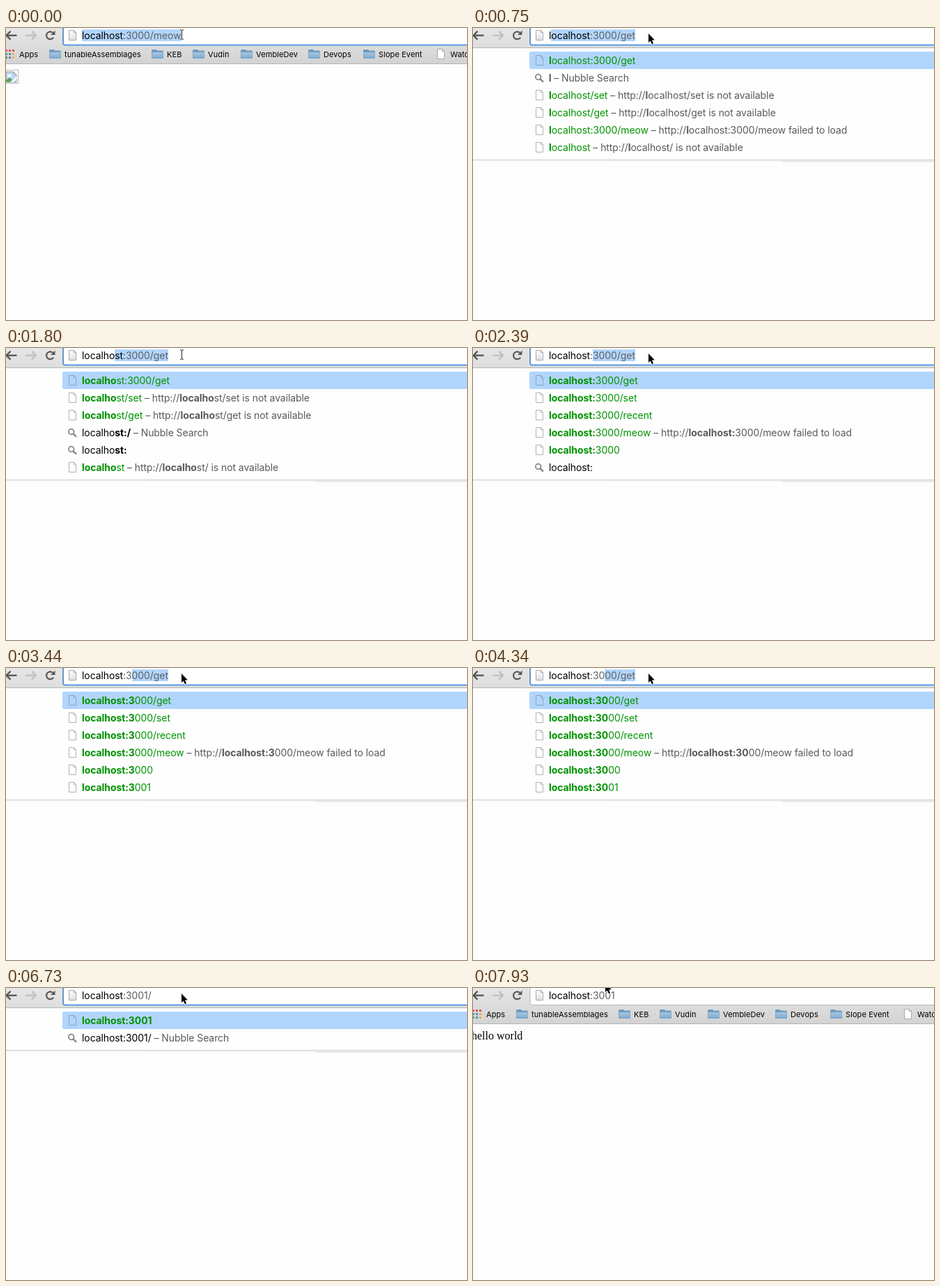
These frames come from a looping animation (662 by 420 pixels, 8 s). An HTML page with a canvas:

```html
<!DOCTYPE html>
<html lang="en">
<head>
<meta charset="utf-8">
<title>Address bar</title>
<style>
html, body { margin: 0; width: 100%; height: 100%; overflow: hidden; background: #fdfdfd; }
canvas { display: block; }
</style>
</head>
<body>
<canvas id="stage" width="662" height="420"></canvas>
<script>
const ctx = document.getElementById('stage').getContext('2d');
const W = 662, H = 420, LOOP = 8000;
const LEFT = 109, ROW = 25, BLUE = '#b1d5fd', GREEN = '#009200', GRAY = '#5a5a5a';
const HOST = 'localhost';

// Suggestion rows: kind (u = address, s = search), text, description
const u = (path, note) => ['u', HOST + path, note ? `http://${HOST}${note}` : ''];
const s = (text, note) => ['s', text, note || ''];
const SEARCH = 'Nubble Search';
const get = u(':3000/get'), set = u(':3000/set'), recent = u(':3000/recent');
const meow = u(':3000/meow', ':3000/meow failed to load');
const messages = u(':3000/messages', ':3000/messages is not available');
const plainSet = u('/set', '/set is not available');
const plainGet = u('/get', '/get is not available');
const plain = u('', '/ is not available');
const slash = s('localhost:/', SEARCH), colon = s('localhost:');

const first = [get, s('l', SEARCH), plainSet, plainGet, meow, plain];
const second = [get, plainSet, meow, slash, colon, plain];
const early = [get, plainSet, plainGet, slash, colon, plain];
const whole = [get, set, meow, messages, slash, plain];
const port = [get, set, recent, meow, u(':3000'), colon];
const digits = [get, set, recent, meow, u(':3000'), u(':3001')];
const short = [get, set];
const found = u(':3001');

// Start time, typed text, rows, matched part when it differs
const typing = [
  [750, 'l', first],
  [1050, 'lo', second],
  [1200, 'loc', early],
  [1350, 'loca', early],
  [1500, 'local', early],
  [1800, 'localho', early],
  [1940, 'localhos', early],
  [2090, 'localhost', whole],
  [2390, 'localhost:', port],
  [3440, 'localhost:3', digits],
  [4340, 'localhost:30', digits],
  [4490, 'localhost:300', digits],
  [4790, 'localhost:3001', short, 'localhost:300'],
  [5240, 'localhost:3001', [found, s('localhost:3001', SEARCH)]],
  [6130, 'localhost:3001/', [found, s('localhost:3001/', SEARCH)]]
];

const pointer = [
  [0, beam, 252, 9], [750, arrow, 252, 8], [1800, beam, 252, 9], [1940, arrow, 252, 8],
  [4640, beam, 252, 9], [4790, arrow, 252, 8], [7030, beam, 252, 9],
  [7630, beam, 215, 7], [7780, beam, 173, 2], [7930, arrow, 190, -7]
];

const at = (list, t) => list.filter(item => item[0] <= t).pop();

function rect(x, y, w, h, fill) {
  ctx.fillStyle = fill;
  ctx.fillRect(x, y, w, h);
}

function shade(y0, y1, top, bottom) {
  const g = ctx.createLinearGradient(0, y0, 0, y1);
  g.addColorStop(0, top);
  g.addColorStop(1, bottom);
  return g;
}

function trace(points, close) {
  ctx.beginPath();
  points.forEach(([x, y]) => ctx.lineTo(x, y));
  if (close) ctx.closePath();
}

function stroke(color, width) {
  ctx.strokeStyle = color;
  ctx.lineWidth = width;
  ctx.stroke();
}

function setFont(weight, size, spacing) {
  ctx.font = `${weight} ${size}px Inter, "Noto Sans", sans-serif`;
  ctx.letterSpacing = spacing + 'px';
}

// Draws a run of text and returns where it ends
function run(str, x, y, color, bold) {
  setFont(bold ? 700 : 400, 14, -0.08);
  ctx.fillStyle = color;
  ctx.fillText(str, x, y);
  return x + ctx.measureText(str).width;
}

function widthOf(str) {
  setFont(400, 14, -0.08);
  return ctx.measureText(str).width;
}

function pageIcon(x, y, fill, edge) {
  trace([[x + .5, y + .5], [x + 7.5, y + .5], [x + 10.5, y + 3.5], [x + 10.5, y + 14.5], [x + .5, y + 14.5]], true);
  if (fill) {
    ctx.fillStyle = fill;
    ctx.fill();
  }
  stroke(edge, 1);
  trace([[x + 7.5, y + .5], [x + 7.5, y + 3.5], [x + 10.5, y + 3.5]]);
  stroke(edge, 1);
}

function lens(y) {
  ctx.beginPath();
  ctx.arc(93.7, y - 1.5, 3.8, 0, 7);
  stroke('#858585', 1.8);
  trace([[96.5, y + 1.3], [101, y + 5.6]]);
  stroke('#858585', 2.4);
}

function navArrow(tip, dir, color) {
  trace([[tip + 6 * dir, 4.7], [tip, 10.7], [tip + 6 * dir, 16.7]]);
  stroke(color, 2.4);
  trace([[tip + dir, 10.7], [tip + 15 * dir, 10.7]]);
  stroke(color, 2.4);
}

function reload() {
  ctx.beginPath();
  ctx.arc(63.5, 10.7, 5.4, .55, 5.5);
  stroke('#5a5a5a', 2.2);
  trace([[70.5, 3.5], [70.5, 10], [64, 10]], true);
  ctx.fillStyle = '#5a5a5a';
  ctx.fill();
}

function toolbar(bottom, focused) {
  rect(0, 0, W, bottom, shade(0, bottom, '#e6e6e6', bottom > 30 ? '#d3d3d3' : '#dedede'));
  rect(0, bottom, W, 1, '#b4b4b4');
  navArrow(.5, 1, '#5a5a5a');
  navArrow(43, -1, '#c2c2c2');
  reload();
  ctx.beginPath();
  ctx.roundRect(82, -20, 700, 44.5, 3);
  ctx.fillStyle = '#fff';
  ctx.fill();
  stroke(focused ? '#569ce6' : '#b3b3b3', focused ? 2 : 1);
  if (focused) rect(82, 0, 1, 22, '#7c8ea4');
  pageIcon(90, 3, shade(3, 18, '#fff', '#dcdfe3'), '#a8a8a8');
}

function address(str, from, to) {
  if (to > from) {
    const x = Math.round(LEFT + widthOf(str.slice(0, from)));
    rect(x, 2, Math.round(LEFT + widthOf(str.slice(0, to))) - x, 17, BLUE);
  }
  const x = run(HOST, LEFT, 16, '#000');
  return run(str.slice(HOST.length), x, 16, '#606060');
}

function folder(x) {
  ctx.beginPath();
  ctx.roundRect(x, 31, 8, 6, 1.5);
  ctx.fillStyle = '#6a98c0';
  ctx.fill();
  ctx.beginPath();
  ctx.roundRect(x, 32.5, 17, 11.5, 1.5);
  ctx.fillStyle = '#6f9cc3';
  ctx.fill();
  rect(x + .5, 35, 16, 8.5, shade(35, 44, '#a6c5df', '#7fa9cd'));
}

function bookmarks() {
  const red = '#e0544a', green = '#46a65a', blue = '#4a86e0', amber = '#eeb03c';
  [red, red, red, green, blue, amber, green, blue, amber].forEach((color, i) =>
    rect(-1 + i % 3 * 5, 31 + Math.floor(i / 3) * 5, 3, 3, color));
  const label = (str, x) => {
    setFont(400, 11, 0.1);
    ctx.fillStyle = '#000';
    ctx.fillText(str, x, 42);
  };
  label('Apps', 19);
  [['tunableAssemblages', 62], ['KEB', 209], ['Vudin', 268], ['VembleDev', 337],
    ['Devops', 434], ['Slope Event', 513]].forEach(([name, x]) => {
    folder(x);
    label(name, x + 22);
  });
  pageIcon(619, 30, '#fff', '#a8a8a8');
  label('Watch', 638);
}

function brokenImage() {
  ctx.strokeStyle = '#bcbcbc';
  ctx.lineWidth = 1;
  ctx.strokeRect(-2.5, 60.5, 20, 19);
  trace([[0, 63], [11, 63], [15, 67], [15, 78], [0, 78]], true);
  ctx.fillStyle = '#bfd6f7';
  ctx.fill();
  stroke('#9a9a9a', 1);
  ctx.beginPath();
  ctx.ellipse(5, 68.5, 3, 1.6, 0, 0, 7);
  ctx.fillStyle = '#fff';
  ctx.fill();
  trace([[0, 77.5], [0, 75], [5, 71.5], [9, 74], [6, 77.5]], true);
  ctx.fillStyle = '#57a54c';
  ctx.fill();
  trace([[15.5, 69], [7, 78.5], [10, 78.5], [15.5, 73]], true);
  ctx.fillStyle = '#fff';
  ctx.fill();
  trace([[11, 63], [11, 67], [15, 67]], true);
  ctx.fillStyle = '#fff';
  ctx.fill();
  stroke('#9a9a9a', 1);
}

function suggestion([kind, text, note], i, match) {
  const mid = 47 + i * ROW, y = mid + 5, n = match.length;
  let x;
  if (kind === 'u') {
    pageIcon(90, mid - 8, i ? '#fff' : null, i ? '#b2b2b2' : '#8fa5bf');
    x = run(text.slice(0, n), LEFT, y, GREEN, true);
    x = run(text.slice(n), x, y, GREEN);
  } else {
    lens(mid);
    x = run(text.slice(0, n), LEFT, y, '#000');
    x = run(text.slice(n), x, y, '#000', true);
  }
  if (!note) return;
  x = run(' – ', x, y, GRAY);
  const k = kind === 'u' ? note.indexOf(match, 7) : -1;
  if (k < 0) {
    run(note, x, y, GRAY);
    return;
  }
  x = run(note.slice(0, k), x, y, GRAY);
  x = run(match, x, y, GRAY, true);
  run(note.slice(k + n), x, y, GRAY);
}

function dropdown(rows, match) {
  const bottom = 39 + rows.length * ROW;
  rect(0, 29, W, bottom - 29, '#fefefe');
  rect(0, bottom, W, 1, '#d8d8d8');
  rect(0, bottom + 1, W, 1, '#e8e8e8');
  rect(190, bottom + 2, 254, 1, '#f3f3f3');
  rect(444, bottom + 2, W - 444, 2, '#e8e8e8');
  ctx.beginPath();
  ctx.roundRect(81, 34, 600, ROW, 2);
  ctx.fillStyle = BLUE;
  ctx.fill();
  rows.forEach((row, i) => suggestion(row, i, match));
}

function beam(x, y) {
  const shape = () => {
    ctx.beginPath();
    for (const d of [-1, 1]) {
      ctx.moveTo(x - 2, y + .5 + 7 * d);
      ctx.quadraticCurveTo(x + .5, y + .5 + 7 * d, x + .5, y + .5 + 5 * d);
      ctx.quadraticCurveTo(x + .5, y + .5 + 7 * d, x + 3, y + .5 + 7 * d);
    }
    ctx.moveTo(x + .5, y - 5);
    ctx.lineTo(x + .5, y + 6);
  };
  shape();
  stroke('rgba(255,255,255,.75)', 2.4);
  shape();
  stroke('#222', 1);
}

function arrow(x, y) {
  trace([[0, 0], [0, 13], [2.8, 10.4], [5, 15.2], [7, 14.3], [5, 9.6], [8.8, 9.2]]
    .map(([a, b]) => [x + a, y + b]), true);
  stroke('#fff', 2);
  ctx.fillStyle = '#000';
  ctx.fill();
}

function draw(t) {
  rect(0, 0, W, H, '#fdfdfd');
  if (t < 750 || t >= 7030) {
    const start = t < 750;
    toolbar(51, start);
    bookmarks();
    if (start) {
      const url = 'localhost:3000/meow';
      address(url, 0, url.length);
      brokenImage();
    } else {
      address('localhost:3001');
      ctx.letterSpacing = '0px';
      ctx.font = '16px "Liberation Serif", serif';
      ctx.fillStyle = '#000';
      ctx.fillText('hello world', -2, 74);
    }
  } else {
    const [, typed, rows, match = typed] = at(typing, t);
    toolbar(28, true);
    dropdown(rows, match);
    if (t < 4790) {
      const url = 'localhost:3000/get';
      address(url, typed.length, url.length);
    } else {
      const end = address(typed);
      const caretOn = t < 5840 || (t >= 6130 && t < 6730);
      if (caretOn) rect(Math.round(end), 2, 1, 17, '#000');
    }
  }
  const [, shape, x, y] = at(pointer, t);
  shape(x, y);
}

function tick(now) {
  draw(now % LOOP);
  requestAnimationFrame(tick);
}
draw(0);
requestAnimationFrame(tick);
</script>
</body>
</html>
```
